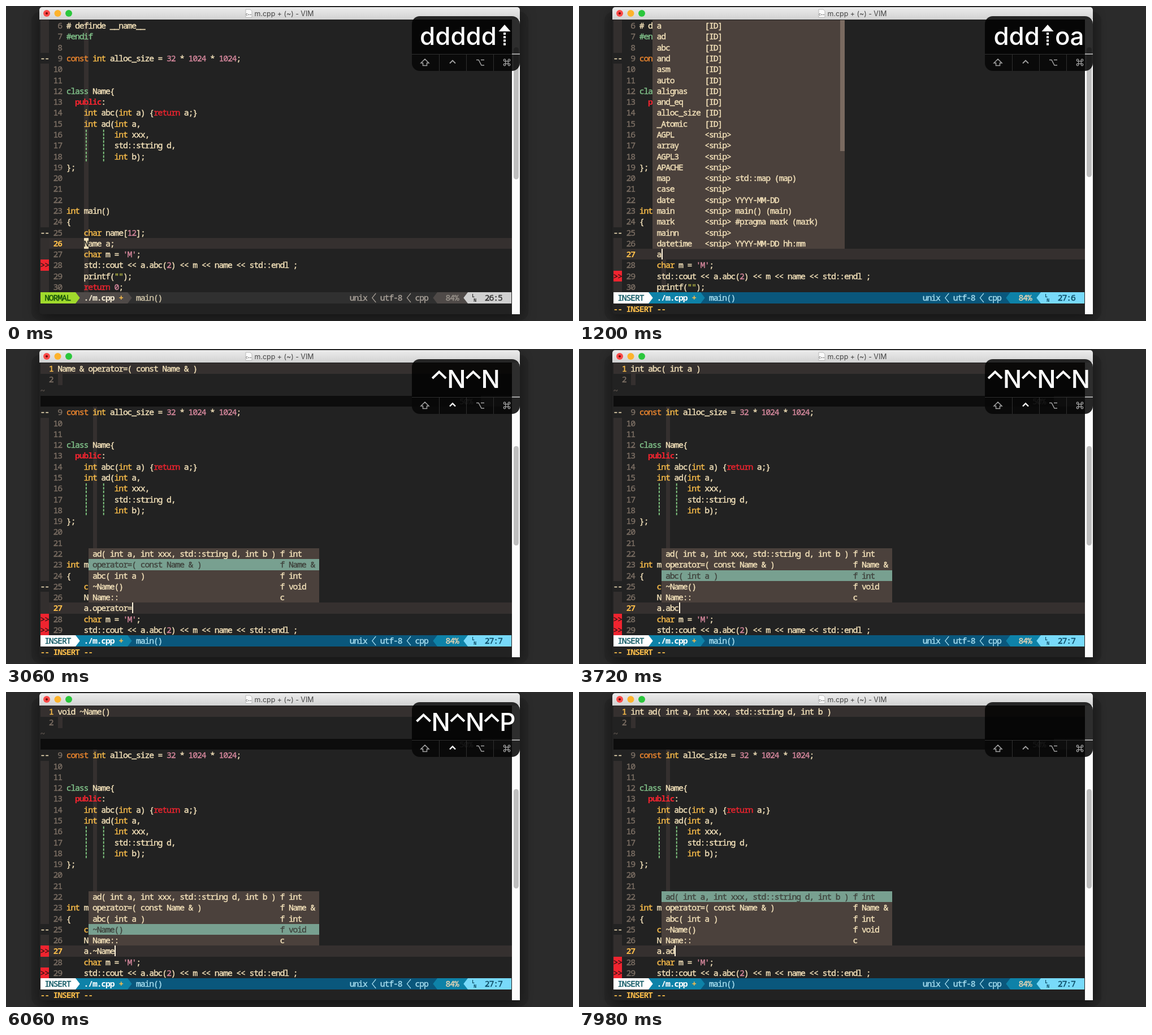
Write an HTML page with a canvas that moves like this. It is 1003 by 558 pixels and loops after 8000 ms.

```html
<!DOCTYPE html>
<html lang="en">
<head>
<meta charset="utf-8">
<title>m.cpp</title>
<style>
html, body { margin: 0; width: 100%; height: 100%; overflow: hidden; background: #2b2b2b; }
canvas { display: block; width: 1003px; height: 558px; }
</style>
</head>
<body>
<canvas id="stage" width="1003" height="558"></canvas>
<script>
const ctx = document.getElementById('stage').getContext('2d');
const LOOP = 8000;
const LEFT = 61, TOP = 25.1, CELL = 7.71, LINE = 19.29, RIGHT = 895;
const TEXT_COL = 6;
const MONO = '"Noto Sans Mono", "DejaVu Sans Mono", monospace';
const SANS = 'Inter, "Open Sans", sans-serif';

const C = {
  bg: '#222222', fg: '#f4e2ba', gutter: '#332f2e', cursorLine: '#35302f', dim: '#7c6f64',
  yellow: '#fabd4a', orange: '#f0882f', green: '#82c48b', red: '#f0242f', purple: '#d3869b',
  menu: '#4b413c', menuBar: '#7a6a60', select: '#78a090'
};
const MODES = {
  NORMAL: { tag: '#a0da2c', tagText: '#14500a', second: '#4f4a48', bar: '#303030', end: '#d0d0d0',
    endText: '#303030', info: '#a8a098', fn: '#cfc4a8', percent: '#9a948c', path: '#f4ead2' },
  INSERT: { tag: '#ffffff', tagText: '#0b5560', second: '#0e82a8', bar: '#0a577c', end: '#78dafa',
    endText: '#0b4a63', info: '#a5dcee', fn: '#a5dcee', percent: '#ead6b4', path: '#ffffff' }
};

const SOURCE = [
  '# definde __name__', '#endif', '', 'const int alloc_size = 32 * 1024 * 1024;', '', '',
  'class Name{', '  public:', '    int abc(int a) {return a;}', '    int ad(int a,',
  '           int xxx,', '           std::string d,', '           int b);', '};', '', '', '',
  'int main()', '{', '    char name[12];', '    Name a;', "    char m = 'M';",
  '    std::cout << a.abc(2) << m << name << std::endl ;', '    printf("");', '    return 0;'
];
const WORDS = [
  ...'a ad abc and asm auto alignas and_eq alloc_size _Atomic'.split(' ').map(w => [w, '[ID]', '']),
  ...'AGPL array AGPL3 APACHE'.split(' ').map(w => [w, '<snip>', '']),
  ['map', '<snip>', 'std::map (map)'], ['case', '<snip>', ''], ['date', '<snip>', 'YYYY-MM-DD'],
  ['main', '<snip>', 'main() (main)'], ['mark', '<snip>', '#pragma mark (mark)'],
  ['mainn', '<snip>', ''], ['datetime', '<snip>', 'YYYY-MM-DD hh:mm']
];
// [inserted word, menu label, kind, return type]
const MEMBERS = [
  ['ad', 'ad( int a, int xxx, std::string d, int b )', 'f', 'int'],
  ['operator=', 'operator=( const Name & )', 'f', 'Name &'],
  ['abc', 'abc( int a )', 'f', 'int'],
  ['~Name', '~Name()', 'f', 'void'],
  ['Name::', 'Name::', 'c', '']
];

// [time, selected member]
const PICKS = [[2580, 0], [3060, 1], [3480, 2], [4320, 3], [5580, 4], [6060, 3], [6480, 2], [7020, 1], [7320, 0]];
const KEYS = [[0, 'ddddd⇡'], [540, 'dddd⇡o'], [960, 'ddd⇡oa'], [1620, 'dd⇡oa.'], [2460, '^N'],
  [2820, '^N^N'], [3300, '^N^N^N'], [6000, '^N^N^P'], [6420, '^N^P^P'], [6960, '^P^P^P']];
const FADES = [[2160, 2400], [7500, 7800]];

const latest = (steps, t) => steps.reduce((value, [at, v]) => t >= at ? v : value, null);
const colX = col => LEFT + col * CELL;
const rowY = row => Math.round(TOP + row * LINE);

function rect(x, y, w, h, color) {
  ctx.fillStyle = color;
  ctx.fillRect(x, y, w, h);
}
function box(x, y, w, h, radii, color) {
  ctx.fillStyle = color;
  ctx.beginPath();
  ctx.roundRect(x, y, w, h, radii);
  ctx.fill();
}
function cells(col, row, cols, color, rows = 1) {
  const x = Math.round(colX(col)), y = rowY(row);
  rect(x, y, Math.round(colX(col + cols)) - x, rowY(row + rows) - y, color);
}
function wideRow(col, row, color, right = RIGHT) {
  const x = Math.round(colX(col)), y = rowY(row);
  rect(x, y, right - x, rowY(row + 1) - y, color);
}
function path(points, color, width) {
  ctx.beginPath();
  points.forEach(([x, y]) => ctx.lineTo(x, y));
  if (width) {
    ctx.strokeStyle = color;
    ctx.lineWidth = width;
    ctx.stroke();
  } else {
    ctx.fillStyle = color;
    ctx.fill();
  }
}
// The thin outline gives the regular face a medium weight.
function put(text, col, row, color = C.fg, bold = false) {
  ctx.font = `${bold ? 700 : 400} 14.8px ${MONO}`;
  ctx.fontStretch = 'condensed';
  ctx.textAlign = 'center';
  ctx.fillStyle = ctx.strokeStyle = color;
  ctx.lineWidth = 0.4;
  [...text].forEach((ch, i) => {
    if (ch === ' ') return;
    const x = colX(col + i + 0.5), y = rowY(row) + 15.2;
    ctx.fillText(ch, x, y);
    if (!bold) ctx.strokeText(ch, x, y);
  });
}

const TOKEN = /#endif|'.'|""|\b(?:const|int|char|class|public|return|\d+)\b/g;
function tokenColor(token) {
  if (token === 'int' || token === 'char') return C.yellow;
  if (token === 'const') return C.orange;
  if (token === 'public' || token === 'return') return C.red;
  if (token === 'class' || token === '#endif') return C.green;
  return token === '""' ? '#b8bb46' : C.purple;
}
function putCode(text, row) {
  let at = 0;
  for (const m of text.matchAll(TOKEN)) {
    put(text.slice(at, m.index), TEXT_COL + at, row);
    put(m[0], TEXT_COL + m.index, row, tokenColor(m[0]), m[0] === 'public');
    at = m.index + m[0].length;
  }
  put(text.slice(at), TEXT_COL + at, row);
}

function drawWindow(thumbTop, thumbBottom) {
  rect(0, 0, 1003, 558, '#2b2b2b');
  box(45, 10, 879, 547, 16, 'rgba(0,0,0,.12)');
  ctx.save();
  ctx.shadowColor = 'rgba(0,0,0,.5)';
  ctx.shadowBlur = 26;
  ctx.shadowOffsetY = 8;
  box(59, 2, 850, 544, 5, C.bg);
  ctx.restore();
  const shade = ctx.createLinearGradient(0, 2, 0, 24);
  shade.addColorStop(0, '#ececec');
  shade.addColorStop(1, '#d2d2d2');
  box(59, 2, 850, 22, [5, 5, 0, 0], shade);
  rect(RIGHT, 24, 14, 522, '#fcfcfc');
  box(898, thumbTop, 9, thumbBottom - thumbTop, 4.5, '#bebebe');
  ['#fc4a48', '#fdb32c', '#2bc73c'].forEach((color, i) => box(66 + i * 19.5, 7, 12, 12, 6, color));
  box(70, 11, 4, 4, 2, '#6b0d0c');
  path([[424, 6], [432, 6], [435, 9], [435, 20], [424, 20]], '#fafafa');
  path([[424, 6], [432, 6], [435, 9], [435, 20], [424, 20], [424, 6]], '#a5a5a5', 0.7);
  ctx.textAlign = 'center';
  ctx.fillStyle = '#555';
  ctx.font = `600 5px ${SANS}`;
  ctx.fillText('C++', 429.5, 17);
  ctx.fillStyle = '#444';
  ctx.font = `400 12.4px ${SANS}`;
  ctx.fillText('m.cpp + (~) - VIM', 492, 17.5);
}

function drawPreview(member) {
  const [, label, , type] = MEMBERS[member];
  wideRow(0, 0, C.cursorLine);
  put('1', 2, 0, C.yellow);
  put((type && type + ' ') + label, 4, 0);
  put('2', 2, 1, C.dim);
  cells(4, 1, 1, C.cursorLine);
  put('~', 0, 2, '#5a524c');
  wideRow(0, 3, '#0d0d0d');
  put('50%', 96.2, 3, '#777');
  cells(101, 3, 7.2, '#3c3c3c');
}

function drawBuffer(s) {
  const firstRow = s.preview ? 4 : 0;
  const firstLine = s.preview ? 9 : 6;
  const rows = 25 - firstRow;
  const cursorRow = s.line - firstLine + firstRow;
  const lines = SOURCE.slice();
  if (s.insert) lines.splice(21, 0, '    ' + s.typed);

  cells(0, firstRow, 2, C.gutter, rows);
  const shadeRows = s.preview ? cursorRow - firstRow : rows;
  cells(TEXT_COL + s.column, firstRow, 1, C.cursorLine, shadeRows);
  wideRow(2, cursorRow, C.cursorLine);

  for (let row = firstRow; row < 25; row++) {
    const number = firstLine + row - firstRow;
    const current = number === s.line;
    const label = String(number);
    put(label, 5 - label.length, row, current ? C.yellow : C.dim, current);
    if (s.errors.includes(number)) {
      cells(0, row, 2, C.red);
      put('>>', 0, row, '#3a1515');
    } else if (number === 9 || number === 25) {
      cells(0, row, 2, C.bg);
      put('--', 0, row);
    }
    putCode(lines[number - 6], row);
    if (number >= 16 && number <= 18) {
      for (const col of [4.5, 8.5]) {
        for (let i = 0; i < 3; i++) {
          rect(colX(TEXT_COL + col) - 1, rowY(row) + 1 + i * LINE / 3, 1.8, 4.4, '#86d287');
        }
      }
    }
  }

  if (s.insert) {
    rect(Math.round(colX(TEXT_COL + 4 + s.typed.length)), rowY(cursorRow), 2, 19, '#fff4dc');
  } else {
    cells(TEXT_COL + 4, cursorRow, 1, C.fg);
    put('N', TEXT_COL + 4, cursorRow, C.bg);
  }
  if (s.menu === 'words') drawWords();
  if (s.menu === 'members') drawMembers(cursorRow - 5, s.pick);
}

function drawWords() {
  cells(9, 0, 44, C.menu, 21);
  cells(52, 0, 1, C.menuBar, 12);
  WORDS.forEach(([word, kind, note], row) => {
    put(word, 10, row);
    put(kind, 21, row);
    put(note, 28, row);
  });
}

function drawMembers(top, pick) {
  cells(11, top, 53, C.menu, 5);
  MEMBERS.forEach(([, label, kind, type], i) => {
    const color = i === pick ? '#40443e' : C.fg;
    if (i === pick) cells(11, top + i, 53, C.select);
    put(label, 12, top + i, color);
    put(kind, 55, top + i, color);
    put(type, 57, top + i, color);
  });
}

function drawStatus(s) {
  const row = 25, y = rowY(row), bottom = rowY(row + 1), mid = (y + bottom) / 2;
  const mode = s.insert ? 'INSERT' : 'NORMAL';
  const m = MODES[mode];
  const arrow = (col, dir, color) => {
    const base = Math.round(colX(dir > 0 ? col : col + 1));
    path([[base, y], [base + dir * CELL, mid], [base, bottom]], color);
  };
  const chevron = col => path([[colX(col + 0.95), y + 2], [colX(col + 0.1), mid], [colX(col + 0.95), bottom - 2]], m.info, 1.2);

  wideRow(0, row, m.bar, RIGHT - 1);
  cells(8, row, 12, m.second);
  arrow(20, 1, m.second);
  cells(0, row, 8, m.tag);
  arrow(8, 1, m.tag);
  put(mode, 1, row, m.tagText);
  put('./m.cpp', 10, row, m.path, true);
  put('+', 18, row, C.yellow, true);
  put('main()', 22, row, m.fn);

  put('unix', 71, row, m.info);
  chevron(76);
  put('utf-8', 78, row, m.info);
  chevron(84);
  put('cpp', 86, row, m.info);
  arrow(90, -1, m.second);
  cells(91, row, 7, m.second);
  put('84%', 93, row, m.percent);
  arrow(97, -1, m.end);
  wideRow(98, row, m.end, RIGHT - 1);
  ctx.font = `700 8px ${MONO}`;
  ctx.fillStyle = m.endText;
  ctx.fillText('L', colX(99.3), y + 9);
  ctx.fillText('N', colX(99.7), y + 16.5);
  put(s.position, 102, row, m.endText);
  if (s.insert) put('-- INSERT --', 0, 26, C.yellow, true);
}

function drawKeys(text, alpha) {
  ctx.save();
  ctx.globalAlpha = alpha;
  ctx.font = `500 44px ${SANS}`;
  ctx.textAlign = 'left';
  ctx.lineJoin = 'miter';
  const width = ch => ch === '^' || ch === '⇡' ? 27 : ctx.measureText(ch).width;
  const chars = [...text];
  let x = 813.5 - chars.reduce((sum, ch) => sum + width(ch), 0) / 2;
  for (const ch of chars) {
    if (ch === '^') {
      path([[x + 1, 52], [x + 13, 40.5], [x + 25, 52]], '#fff', 4);
    } else if (ch === '⇡') {
      const mid = x + 14;
      path([[mid - 10.5, 45], [mid, 33], [mid + 10.5, 45]], '#fff');
      for (let i = 0; i < 4; i++) rect(mid - 2, 47 + i * 6.2, 4, 4, '#fff');
    } else {
      ctx.fillStyle = '#fff';
      ctx.fillText(ch, x, 69);
    }
    x += width(ch);
  }
  ctx.restore();
}

function drawOverlay(s) {
  box(718, 18, 191, 67, [14, 14, 0, 0], 'rgba(0,0,0,.82)');
  box(718, 85, 191, 30, [0, 0, 14, 14], 'rgba(8,8,8,.87)');
  rect(718, 85, 177, 1, '#303030');
  rect(RIGHT, 84.5, 14, 1.2, '#f4f4f4');
  [766, 814, 862].forEach(x => rect(x, 86, 1, 29, '#303030'));

  const grey = '#a2a2a2';
  path([[741, 94], [748, 101], [744.5, 101], [744.5, 105.5], [737.5, 105.5], [737.5, 101], [734, 101], [741, 94], [748, 101]], grey, 1.5);
  path([[785, 101.5], [790, 96.5], [795, 101.5]], s.ctrl ? '#fff' : grey, s.ctrl ? 2.4 : 1.8);
  path([[832, 95.5], [836, 95.5], [841, 105], [846, 105]], grey, 1.5);
  path([[840, 95.5], [846, 95.5]], grey, 1.5);
  ctx.strokeStyle = grey;
  ctx.lineWidth = 1.3;
  ctx.strokeRect(883.7, 97.7, 4.6, 4.6);
  for (const dx of [-1, 1]) {
    for (const dy of [-1, 1]) {
      ctx.beginPath();
      ctx.arc(886 + dx * 4, 100 + dy * 4, 1.8, 0, Math.PI * 2);
      ctx.stroke();
    }
  }
  drawKeys(s.keys, s.keyAlpha);
}

function keyAlpha(t) {
  const [from, to] = FADES[t < 2460 ? 0 : 1];
  return 1 - Math.min(1, Math.max(0, (t - from) / (to - from)));
}

function stateAt(t) {
  const pick = latest(PICKS, t);
  const preview = pick !== null;
  const insert = t >= 540;
  const dotted = t >= 1620;
  const typed = preview ? 'a.' + MEMBERS[pick][0] : dotted ? 'a.' : t >= 960 ? 'a' : '';
  const column = insert ? 4 + Math.min(typed.length, 2) : 4;
  return {
    pick, preview, insert, typed, column,
    line: insert ? 27 : 26,
    position: insert ? '27:' + (column + 1) : '26:5',
    errors: !insert ? [28] : !preview ? [29] : pick === 3 ? [27, 29] : [28, 29],
    menu: preview || t >= 1800 ? 'members' : t >= 1020 && !dotted ? 'words' : '',
    ctrl: t >= 2340 && t < 7560,
    keys: latest(KEYS, t),
    keyAlpha: keyAlpha(t)
  };
}

function frame(now) {
  const s = stateAt(now % LOOP);
  if (s.preview) drawWindow(172, 348);
  else drawWindow(73, s.insert ? 303 : 307);
  if (s.preview) drawPreview(s.pick);
  drawBuffer(s);
  drawStatus(s);
  drawOverlay(s);
  requestAnimationFrame(frame);
}
requestAnimationFrame(frame);
</script>
</body>
</html>
```
